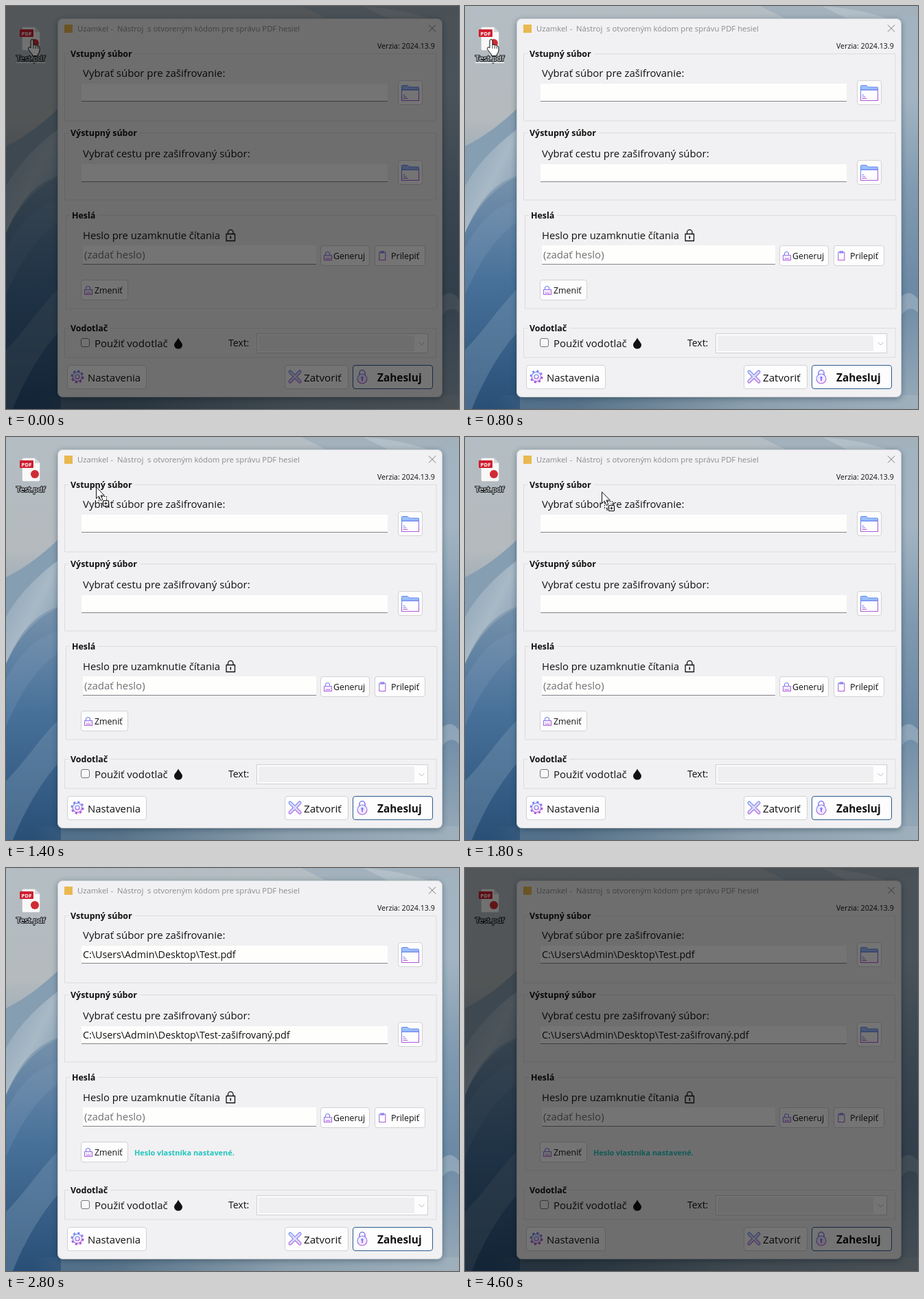
Recreate the animation shown at these times as an HTML page. Size 660x586 px, loop 4800 ms.

```html
<!DOCTYPE html>
<html lang="sk">
<head>
<meta charset="utf-8">
<title>Správa hesiel</title>
<style>
  html, body { margin: 0; width: 100%; height: 100%; overflow: hidden; background: #8098ac; }
  svg { display: block; width: 660px; height: 586px; }
  text { font-family: "Open Sans", "Noto Sans", sans-serif; fill: #111; white-space: pre; }
  .b { font-weight: 700; }
  .muted { fill: #8b8b8e; }
  .hint { fill: #707072; }
  .teal { fill: #20c4bd; font-weight: 700; }
  .name { fill: #fff; stroke: #1c2226; stroke-width: 2.2; stroke-linejoin: round; paint-order: stroke; }
  .line { fill: none; stroke: #dcdcde; }
  .field { fill: #fefefd; }
  .btn { fill: #fdfdfd; stroke: #d2d2d5; }
  .main { stroke: #2d5c8e; }
  .ico { fill: none; stroke: url(#violet); stroke-width: 1.1; stroke-linejoin: round; stroke-linecap: round; }
  .cur { fill: #fff; stroke: #111; stroke-linejoin: round; }
</style>
</head>
<body>
<svg id="stage" viewBox="0 0 660 586">
  <defs>
    <linearGradient id="sky" x2="0" y2="1">
      <stop offset="0" stop-color="#b3bdc3"/><stop offset=".28" stop-color="#b4babd"/>
      <stop offset=".5" stop-color="#829bb1"/><stop offset="1" stop-color="#56738f"/>
    </linearGradient>
    <linearGradient id="petal" x2="1" y2="1">
      <stop offset="0" stop-color="#889fb3"/><stop offset=".5" stop-color="#a8b9c6"/><stop offset="1" stop-color="#7893ac"/>
    </linearGradient>
    <linearGradient id="deep" x2="0" y2="1">
      <stop offset="0" stop-color="#7792ac"/><stop offset=".45" stop-color="#48719a"/><stop offset="1" stop-color="#294f77"/>
    </linearGradient>
    <linearGradient id="floor">
      <stop offset="0" stop-color="#496782" stop-opacity="0"/><stop offset=".2" stop-color="#587389"/>
      <stop offset=".6" stop-color="#8b9fae"/><stop offset="1" stop-color="#9fb0bc"/>
    </linearGradient>
    <linearGradient id="side" x2="0" y2="1">
      <stop offset="0" stop-color="#a2b3c0"/><stop offset=".2" stop-color="#a3b5c3"/>
      <stop offset=".45" stop-color="#7f99b0"/><stop offset=".7" stop-color="#6c89a5"/><stop offset="1" stop-color="#98abb9"/>
    </linearGradient>
    <linearGradient id="violet" x2=".4" y2="1">
      <stop offset="0" stop-color="#6a90f4"/><stop offset="1" stop-color="#b257dc"/>
    </linearGradient>
    <filter id="soft" x="-10%" y="-10%" width="120%" height="120%"><feGaussianBlur stdDeviation="4"/></filter>
  </defs>

  <g id="wall">
    <rect width="660" height="586" fill="url(#sky)"/>
    <path d="M0 204C28 190 55 170 80 145V586H0Z" fill="#869eb2"/>
    <path d="M0 262C18 228 48 200 80 176V245C44 256 20 282 0 330Z" fill="url(#petal)"/>
    <path d="M0 330C20 286 46 262 80 246V586H0Z" fill="url(#deep)"/>
    <path d="M0 352C28 300 52 290 80 280V312C48 330 22 370 0 420Z" fill="#7f9db7" opacity=".25"/>
    <path d="M0 500C30 470 55 430 80 408V470C52 500 26 545 10 586H0Z" fill="#7896b0" opacity=".4"/>
    <path d="M430 0H660V20H470Z" fill="#a2b1bc"/>
    <path d="M520 0C560 3 590 9 620 20H560Z" fill="#b2bfc8"/>
    <rect x="630" y="14" width="30" height="572" fill="url(#side)"/>
    <path d="M634 424C644 414 652 416 660 426V446C650 436 642 440 634 452Z" fill="#a3b6c5" opacity=".6"/>
    <rect x="40" y="566" width="620" height="20" fill="url(#floor)"/>
  </g>
  <g id="file"></g>
  <rect x="75" y="20" width="561" height="551" rx="8" fill="#0d2030" opacity=".38" filter="url(#soft)"/>
  <rect x="75.5" y="18.5" width="560" height="550" rx="7" fill="#f1f0f2" stroke="#c9cdd1"/>
  <g id="ui"></g>
  <g id="result"></g>

  <g id="hand">
    <path class="cur" d="M36 61V51Q36 48.500 38 48.500T40 51V56.500Q42 55.300 43.300 57Q45.400 56.200 46.300 58Q48.800 57.500 49 60V65Q48.500 68.500 46.500 70V72.500H38.500V70.500L33.300 64Q31.500 61.300 33 60.300T36 61Z"/>
    <path d="M40 56V62M43.300 57.500V62M46.300 58.500V62" stroke="#111" stroke-width=".8"/>
  </g>
  <g id="arrow">
    <g id="badge">
      <rect x="4.500" y="14.500" width="11" height="10" fill="#fff" fill-opacity=".75" stroke="#111" stroke-dasharray="2 1.500"/>
      <rect id="plus" x="10.500" y="20.500" width="8" height="8" fill="#fff" stroke="#111" stroke-width="1.200"/>
      <path d="M12.500 24.500H16.500M14.500 22.500V26.500" stroke="#111" stroke-width="1.200"/>
    </g>
    <path class="cur" d="M.5 .8V17.500L4.300 14L7.100 20.300L9.800 19.100L7 13H12.300Z"/>
  </g>
  <rect id="dim" width="660" height="586" opacity=".54"/>
</svg>

<script>
const $ = id => document.getElementById(id);
const text = (x, y, size, str, cls = '') => `<text x="${x}" y="${y}" font-size="${size}" class="${cls}">${str}</text>`;
const path = (d, cls, more = '') => `<path d="${d}" class="${cls}" ${more}/>`;
const box = (x, y, w, h, cls, r = 0) => `<rect x="${x}" y="${y}" width="${w}" height="${h}" rx="${r}" class="${cls}"/>`;
const button = (x, y, w, h, cls = '') => box(x + .5, y + .5, w - 1, h - 1, 'btn ' + cls, 3.5);
const at = (x, y, art) => `<g transform="translate(${x} ${y})">${art}</g>`;

// Frame with a gap in its top edge for the caption
const group = (x, y, w, h, label, lx, lw) =>
  path(`M${lx - 3} ${y + .5}H${x + .5}V${y + h}H${x + w}V${y + .5}H${lx + lw + 4}`, 'line') +
  text(lx, y + 5, 12.45, label, 'b');

const field = (x, y, w, h) => box(x, y, w, h, 'field') +
  path(`M${x} ${y + h - .5}H${x + w}`, '', 'stroke="#85858a"');

const folder = y => button(571, y, 36, 36) + at(576, y + 7,
  path('M.5 3V1.500Q.5 .5 1.500 .5H9L11.500 3H24.500Q25.500 3 25.500 4V7H.5Z', '', 'fill="#9cc0fb" stroke="#6587f0"') +
  path('M.5 7H25.500V22.500H.5Z', 'ico') + path('M3 14.500H5M3 17H7M3 19.500H9', 'ico'));

const key = (x, y) => at(x, y,
  path('M2.500 5V3.500A3 3 0 0 1 8.500 3.500V5M.5 5.500H11.500V12.500H.5ZM3 8H3.300M6 8H6.300M9 8H9.300M3 10.500H9', 'ico'));

const clip = at(543, 356, path('M.8 2H9.800V13.500H.8Z', 'ico') + path('M3 .8H7.500V3H3Z', 'ico', 'style="fill:#b79af0"'));

const gear = at(104, 539,
  '<circle r="8.300" class="ico" style="stroke-width:2.400;stroke-dasharray:3.260;stroke-linecap:butt"/>' +
  '<circle r="6.800" class="ico" style="fill:#eef1ff"/><circle r="3" class="ico"/>');

const cross = at(421, 539,
  path('M-7 -7L7 7M7 -7L-7 7', 'ico', 'style="stroke-width:5"') +
  path('M-7 -7L7 7M7 -7L-7 7', '', 'stroke="#d6dcfc" stroke-width="3" stroke-linecap="round"'));

const padlock = at(519, 542,
  path('M-4 -5V-8.500A4 4 0 0 1 4 -8.500V-5', 'ico', 'style="stroke-width:1.500"') +
  '<circle r="7" class="ico" style="fill:#eeeaff"/>' + path('M0 -2.500V2.500M-1 -1.500H1', 'ico', 'style="stroke-width:1.800"'));

const lock = at(320, 325,
  path('M3.500 6.500V4.200A3.750 3.750 0 0 1 11 4.200V6.500M1 6.500H13.500V16.500H1Z', '', 'fill="none" stroke="#111" stroke-width="1.300" stroke-linejoin="round"') +
  path('M7.250 9.500V13.500', '', 'stroke="#111" stroke-width="1.600"'));

$('file').innerHTML =
  path('M25 30.500H42L49.500 38V62Q49.500 64.500 47 64.500H25.500Q23.500 64.500 23.500 62V32Z', '', 'fill="#f8f8f8" stroke="#c2c5c8" stroke-width=".7"') +
  path('M42 30.500V38H49.500Z', '', 'fill="#d5d8da"') +
  '<rect x="20" y="34" width="20" height="11" rx="1" fill="#ce2030"/>' +
  '<text x="22.500" y="42.500" font-size="7.800" class="b" style="fill:#fff">PDF</text>' +
  '<circle cx="42" cy="54" r="6" fill="#cf2b35"/>' +
  text(15, 80, 11.4, 'Test.pdf', 'name') +
  '<path id="under" d="M15 82.500H57" stroke="#fff"/>';

$('ui').innerHTML =
  '<rect x="85" y="27" width="12" height="12" fill="#e9b850"/>' +
  text(104, 37, 11.3, 'Uzamkel', 'muted') + text(152.500, 37, 11.3, '-', 'muted') +
  text(162, 37, 11.3, 'Nástroj  s otvoreným kódom pre správu PDF hesiel', 'muted') +
  path('M616 27.500L626 37.500M626 27.500L616 37.500', '', 'stroke="#77777a"') +
  text(541, 61.5, 10.65, 'Verzia: 2024.13.9') +

  group(85, 69, 542, 98, 'Vstupný súbor', 94, 90) +
  text(112, 103, 14.95, 'Vybrať súbor pre zašifrovanie:') + field(110, 113, 446, 26) + folder(108) +

  group(85, 184, 542, 98, 'Výstupný súbor', 94, 97) +
  text(112, 220, 14.95, 'Vybrať cestu pre zašifrovaný súbor:') + field(110, 230, 446, 26) + folder(224) +

  group(87, 304, 541, 136, 'Heslá', 96, 34) +
  text(112, 339, 14.8, 'Heslo pre uzamknutie čítania') + lock +
  field(112, 348, 340, 28) + text(114, 367, 15, '(zadať heslo)', 'hint') +
  button(458, 348, 72, 30) + key(463, 357) + text(477, 368, 12.35, 'Generuj') +
  button(537, 348, 74, 30) + clip + text(561, 368, 12.5, 'Prilepiť') +
  button(109, 398, 69, 30) + key(114, 407) + text(129, 418, 12.4, 'Zmeniť') +

  group(85, 468, 542, 43, 'Vodotlač', 94, 54) +
  '<rect x="109.500" y="483.500" width="12" height="12" rx="2.500" fill="#f8f8f8" stroke="#77777a"/>' +
  text(129, 496, 15, 'Použiť vodotlač') +
  path('M251 482.500C253 487 257 489.500 257 493A6 5.600 0 0 1 245 493C245 489.500 249 487 251 482.500Z', '', 'fill="#111"') +
  text(324, 495, 14, 'Text:') +
  '<rect x="365.500" y="476.500" width="249" height="28" fill="#fdfdfd" stroke="#d0d0d3"/>' +
  '<rect x="368" y="479" width="227" height="23" fill="#efeff1"/>' +
  path('M601.500 489L605.500 493L609.500 489', '', 'fill="none" stroke="#b9b9bd"') +

  button(89, 522, 116, 35) + gear + text(119, 546, 14.9, 'Nastavenia') +
  button(406, 522, 93, 35) + cross + text(434, 546, 15.2, 'Zatvoriť') +
  button(505, 522, 117, 35, 'main') + padlock + text(541, 546, 15.4, 'Zahesluj', 'b');

$('result').innerHTML =
  text(112, 131, 14.25, 'C:\\Users\\Admin\\Desktop\\Test.pdf') +
  text(112, 248, 14.28, 'C:\\Users\\Admin\\Desktop\\Test-zašifrovaný.pdf') +
  text(187, 418, 10.9, 'Heslo vlastníka nastavené.', 'teal');

// Pointer steps: start ms, x, y, dragging
const LOOP = 4800, DRAG = 1200, DROP = 2800;
const steps = [
  [1200, 102, 69, true],
  [1400, 131, 72, true],
  [1600, 181, 75, true],
  [1800, 199, 79, true],
  [2000, 209, 83, true],
  [2400, 209, 83, false]
];
const show = (id, on) => { $(id).style.display = on ? '' : 'none'; };

function draw(t) {
  show('dim', t < 200 || t >= 4600);
  show('hand', t < DRAG);
  show('under', t < DRAG);
  show('result', t >= DROP);
  show('arrow', t >= DRAG && t < DROP);
  const step = steps.filter(s => s[0] <= t).pop();
  if (!step) return;
  const [from, x, y, dragging] = step;
  $('arrow').setAttribute('transform', `translate(${x} ${y})`);
  show('badge', dragging);
  $('plus').setAttribute('rx', from === DRAG ? 4 : 1);
}

const start = performance.now();
function tick() {
  draw((performance.now() - start) % LOOP);
  requestAnimationFrame(tick);
}
tick();
</script>
</body>
</html>
```
